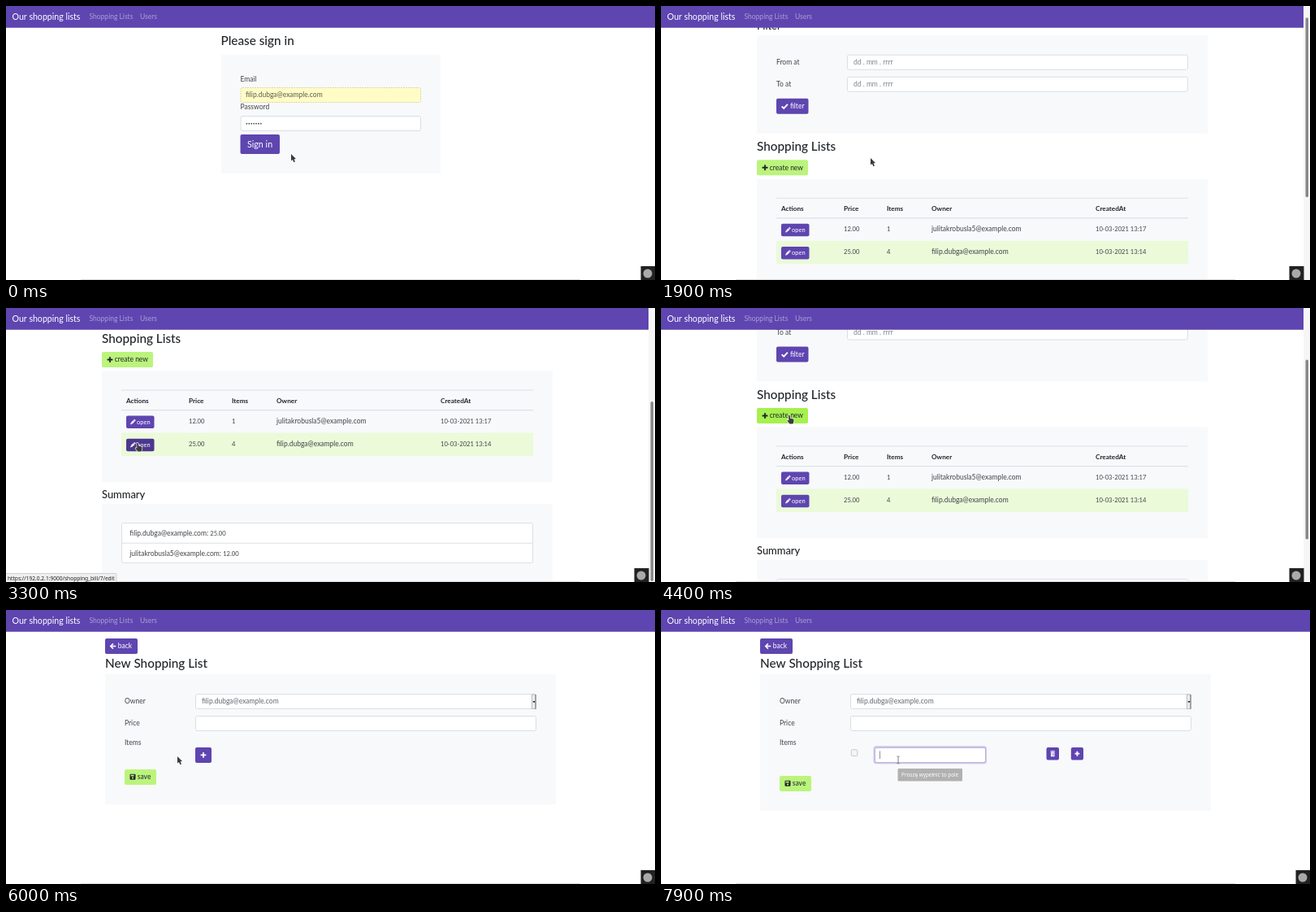
Recreate the animation shown at these times as an HTML page with a canvas. Size 799 by 337 pixels, loop 8 s.

```html
<!DOCTYPE html>
<html lang="en">
<head>
<meta charset="utf-8">
<title>Our shopping lists</title>
<style>
html, body { margin: 0; width: 100%; height: 100%; overflow: hidden; background: #fff; }
canvas { display: block; }
</style>
</head>
<body>
<canvas id="stage" width="799" height="337"></canvas>
<script>
const ctx = document.getElementById('stage').getContext('2d');
const LOOP = 8000, STEP = 100;
const PURPLE = '#5e45b0', PURPLE_DARK = '#4c378f', LIME = '#bbf47c', LIME_DARK = '#a6f04f';
const INK = '#404448', HEAD = '#212529', FIELD = '#626970';
const CARD = '#f8f9fb', LINE = '#dadee3', RULE = '#dee2e6', SYS_LINE = '#cdcdd0';
const UI = 'Lato, sans-serif', SYS = '"Noto Sans", sans-serif';
const ME = 'filip.dubga@example.com', FRIEND = 'julitakrobusla5@example.com';
const HOST = '192.0.2.1', BASE = 'https://192.0.2.1:9000/shopping_bill/';

// rows of [time, value...]; eased between neighbours
const MOUSE = [
  [0, 351, 182], [300, 322, 167], [400, 322, 167], [700, 326, 179], [1600, 326, 179],
  [2200, 190, 195], [2500, 190, 195], [3200, 162, 172], [3300, 161, 166], [3700, 161, 166],
  [4300, 157, 132], [4800, 157, 132], [5500, 263, 124], [6000, 211, 180], [6400, 240, 178],
  [6800, 240, 178], [7300, 292, 184]
];
const SCROLL = [[1700, 0], [2300, 68.5], [2500, 68.5], [2900, 153], [3700, 153], [4300, 84]];

let mouse, pointer, offset;

function track(rows, t) {
  let i = rows.findIndex(r => r[0] > t);
  if (i < 0) return rows[rows.length - 1].slice(1);
  if (i === 0) return rows[0].slice(1);
  const a = rows[i - 1], b = rows[i];
  const p = (t - a[0]) / (b[0] - a[0]), e = p * p * (3 - 2 * p);
  return a.slice(1).map((v, k) => v + (b[k + 1] - v) * e);
}

function rect(x, y, w, h, fill, r = 0, stroke) {
  ctx.beginPath();
  ctx.roundRect(x, y, w, h, r);
  if (fill) { ctx.fillStyle = fill; ctx.fill(); }
  if (stroke) { ctx.strokeStyle = stroke; ctx.lineWidth = 1; ctx.stroke(); }
}

function text(str, x, y, { size = 8.5, color = INK, weight = 400, font = UI, align = 'left' } = {}) {
  ctx.font = `${weight} ${size}px ${font}`;
  ctx.fillStyle = color;
  ctx.textAlign = align;
  ctx.fillText(str, x, y);
  return ctx.measureText(str).width;
}

function path(points, width, color, close) {
  ctx.beginPath();
  points.forEach(([x, y]) => ctx.lineTo(x, y));
  if (close) ctx.closePath();
  ctx.lineWidth = width;
  ctx.strokeStyle = color;
  ctx.stroke();
}

const num = (s, x, y) => text(s, x, y, { size: 7.6 });
const title = (s, x, y, size = 15.3) => text(s, x, y, { size, weight: 500, color: HEAD });
const over = (x, y, w, h) =>
  mouse[0] >= x && mouse[0] <= x + w && mouse[1] >= y + offset && mouse[1] <= y + h + offset;

function button(x, y, w, h, lime) {
  const hot = over(x, y, w, h);
  if (hot) pointer = 'hand';
  rect(x, y, w, h, lime ? (hot ? LIME_DARK : LIME) : (hot ? PURPLE_DARK : PURPLE), 2);
}

function input(x, y, w, h = 19) {
  if (over(x, y, w, h)) pointer = 'text';
  rect(x + .5, y + .5, w - 1, h - 1, '#fff', 2, LINE);
}

// icons are placed by their centre
function plus(x, y, r, color) {
  rect(x - r, y - .9, 2 * r, 1.8, color, .5);
  rect(x - .9, y - r, 1.8, 2 * r, color, .5);
}
function check(x, y) {
  path([[x - 3.6, y + .2], [x - 1.1, y + 2.6], [x + 3.6, y - 2.4]], 1.9, '#fff');
}
function pencil(x, y) {
  ctx.save();
  ctx.translate(x, y);
  ctx.rotate(Math.PI / 4);
  rect(-1.2, -4.2, 2.4, 1.5, '#fff', .5);
  rect(-1.2, -2.3, 2.4, 4.2, '#fff');
  ctx.beginPath();
  ctx.moveTo(-1.2, 2); ctx.lineTo(1.2, 2); ctx.lineTo(0, 4.2);
  ctx.fill();
  ctx.restore();
}
function trash(x, y) {
  rect(x - 2.8, y - 3.2, 5.6, 1, '#fff');
  rect(x - 1, y - 3.8, 2, .8, '#fff');
  rect(x - 2.3, y - 1.8, 4.6, 5.4, '#fff', .6);
  for (const d of [-1.2, 0, 1.2]) rect(x + d - .2, y - .9, .4, 3.5, PURPLE);
}
function disk(x, y) {
  rect(x - 3.5, y - 3.5, 7, 7, HEAD, 1);
  rect(x - 2.4, y - 2.5, 4, 1.8, LIME);
  ctx.beginPath();
  ctx.arc(x, y + 1.4, 1.1, 0, 7);
  ctx.fill();
}
function arrowLeft(x, y) {
  path([[x + 3.5, y], [x - 2.8, y]], 1.6, '#fff');
  path([[x + .2, y - 3.1], [x - 2.9, y], [x + .2, y + 3.1]], 1.6, '#fff');
}
function chevron(x, y, color = '#333') {
  path([[x - 2.2, y - 1.1], [x, y + 1.1], [x + 2.2, y - 1.1]], 1.2, color);
}

function navbar(w) {
  rect(0, 0, w, 26.7, PURPLE);
  text('Our shopping lists', 7.5, 16.7, { size: 10.6, color: '#fff' });
  const color = 'rgba(255,255,255,.48)';
  text('Shopping Lists', 102.5, 16.2, { color });
  text('Users', 165, 16.2, { color });
}

function toolbar(x) {
  rect(x, 320, 18, 17, '#222');
  ctx.beginPath();
  ctx.arc(x + 8.5, 329, 5.5, 0, 7);
  ctx.fillStyle = '#aaa';
  ctx.fill();
}

function status(str, w) {
  rect(-1, 326.5, w, 12, '#efeff0', 1, '#d2d2d4');
  text(str, 2, 334.8, { size: 6.6, font: SYS, color: '#222' });
}

function dots(x, y, n, gap) {
  ctx.fillStyle = '#444';
  for (let i = 0; i < n; i++) {
    ctx.beginPath();
    ctx.arc(x + i * gap, y, .85, 0, 7);
    ctx.fill();
  }
}

function signIn() {
  title('Please sign in', 264.5, 48.3);
  rect(265, 60, 270, 146, CARD);
  text('Email', 288.5, 92.5);
  rect(289, 100.5, 221.5, 18, '#fffcc6', 2);
  ctx.setLineDash([2, 1]);
  rect(289, 100.5, 221.5, 18, null, 2, '#ddd8a8');
  ctx.setLineDash([]);
  text(ME, 295, 112.3, { color: '#5c5b4c' });
  text('Password', 288.5, 127.3);
  input(288.5, 135, 222.5);
  dots(296.4, 144.7, 7, 2.9);
  button(288.5, 158, 48.5, 24);
  text('Sign in', 297, 173.7, { size: 10.7, color: '#fff' });
}

function listRow(y, price, items, owner, date) {
  button(148, y + 6.5, 34.5, 15.5);
  pencil(156, y + 14.4);
  text('open', 161, y + 16.7, { size: 7.5, color: '#fff' });
  num(price, 225, y + 15.6);
  num(items, 278, y + 15.6);
  text(owner, 333, y + 15.6);
  num(date, 535, y + 15.6);
}

function shoppingLists() {
  title('Filter', 118, 47, 12.9);
  rect(118, 54, 555, 120.5, CARD);
  [['From at', 77.5], ['To at', 104.5]].forEach(([label, y]) => {
    text(label, 142, y + 12);
    input(229, y, 420);
    text('dd . mm . rrrr', 237, y + 12, { color: '#7f868c' });
  });
  button(142, 131.5, 39.5, 19);
  check(152.3, 141);
  text('filter', 159, 143.8, { color: '#fff' });

  title('Shopping Lists', 118, 195.7);
  button(118, 207, 63, 19, true);
  plus(128, 216.5, 3.4, HEAD);
  text('create new', 133.8, 219.4, { color: HEAD });

  rect(118, 230.5, 555, 136.5, CARD);
  rect(142, 253.5, 507, 1, RULE);
  [['Actions', 148], ['Price', 225], ['Items', 278], ['Owner', 333], ['CreatedAt', 535]]
    .forEach(([s, x]) => text(s, x, 269.5, { weight: 700, size: 8.2, color: HEAD }));
  rect(142, 278, 507, 1.2, RULE);
  rect(142, 306.5, 507, 28.5, '#ebfad9');
  listRow(279, '12.00', '1', FRIEND, '10-03-2021 13:17');
  listRow(307.2, '25.00', '4', ME, '10-03-2021 13:14');

  title('Summary', 118, 387, 12.9);
  rect(118, 394, 555, 96, CARD);
  rect(142.5, 417.5, 506, 49, '#fff', 2, '#dcdfe2');
  rect(142, 441.8, 507, 1, '#dcdfe2');
  [[ME, '25.00', 433.2], [FRIEND, '12.00', 457.6]].forEach(([who, sum, y]) => {
    const w = text(who + ': ', 152.3, y);
    num(sum, 152.3 + w, y);
  });
}

function scrollbar(s) {
  rect(791, 0, 8, 337, '#f6f6f7');
  rect(793.5, 1 + s * .745, 3.5, 221, '#88888a', 1.7);
}

function newList(t) {
  const added = t >= 6900, shift = added ? 8 : 0;
  button(122, 35, 40, 19);
  arrowLeft(131.7, 44.5);
  text('back', 137.8, 47.4, { color: '#fff' });
  title('New Shopping List', 122, 71.3);
  rect(122, 79, 555, 160 + shift, CARD);
  text('Owner', 146, 115.2);
  rect(233.5, 103.5, 419, 18, '#fff', 2, LINE);
  text(ME, 241, 115.2, { color: FIELD });
  rect(647.5, 104, 4.5, 17.5, '#ececed', 0, '#bcbcbe');
  rect(651.5, 104, 1, 18, '#777');
  rect(648.8, 112, 2.4, 1.6, '#222');
  text('Price', 146, 142.2);
  input(233, 130, 420);
  text('Items', 146, 165.5);

  if (added) itemRow(t);
  else {
    button(233, 169, 20, 19);
    plus(243, 178.3, 3.4, '#fff');
  }
  button(146, 196 + shift, 39, 19, true);
  disk(156, 205.2 + shift);
  text('save', 161.8, 208.3 + shift, { color: HEAD });
}

function itemRow(t) {
  rect(234.3, 171.8, 7.5, 7.7, '#f5f5f6', 1.5, '#c8c8cb');
  const focus = Math.max(0, Math.min(1, (t - 7300) / 200));
  if (focus) rect(261.5, 167.3, 139.5, 22, `rgba(94,69,176,${.28 * focus})`, 3.5);
  input(263, 169, 137);
  if (focus) {
    rect(263.5, 169.5, 136, 18, null, 2, `rgba(190,179,226,${focus})`);
    rect(269.2, 173.5, .8, 9.5, '#777');
  }
  button(474.5, 169, 15.5, 15.5);
  trash(482.2, 176.7);
  button(504.8, 169, 15.2, 15.5);
  plus(512.4, 176.7, 3, '#fff');
  if (t >= 7900) {
    rect(291.5, 195, 79.5, 15.5, '#b1b1b1', 1);
    text('Proszę wypełnić to pole', 331.2, 205.2, { size: 6.4, font: SYS, color: '#fff', align: 'center' });
  }
}

function savePrompt(alpha, dy) {
  const sys = (s, x, y, color = '#222', align) => text(s, x, y, { size: 6.6, font: SYS, color, align });
  ctx.save();
  ctx.globalAlpha = alpha;
  ctx.translate(0, dy);
  rect(147, -30, 198, 110.3, '#fbfbfb', 0, '#9c9ca2');
  rect(176, 4, 161.5, 15, '#fff', 1.5, SYS_LINE);
  sys(ME, 180, 14);
  chevron(333, 11.8);
  rect(176, 22, 161.5, 15, '#fff', 1.5, SYS_LINE);
  dots(181.5, 29.7, 7, 3);
  rect(177.5, 42.3, 7.5, 7.5, '#f3f3f3', 1, '#b5b5b8');
  sys('Widoczne hasło', 186.8, 48.5);
  rect(219, 49.5, 4, .6, '#222');
  rect(147.3, 59, 99.7, 21.2, '#ebebed');
  rect(147.3, 58.3, 197.5, .7, '#c9c9cc');
  rect(223, 62, .8, 15.5, '#c4c4c8');
  sys('Nie uaktualniaj', 185.7, 72.3, '#222', 'center');
  rect(162.2, 73.4, 4.5, .6, '#222');
  chevron(235, 69.8);
  rect(246.6, 58.7, 98.2, 21.5, '#0060df');
  sys('Uaktualnij', 296.3, 72.3, '#fff', 'center');
  rect(280.5, 73.4, 4.5, .6, '#fff');
  ctx.restore();
}

function shape(points) {
  const at = points.map(([x, y]) => [mouse[0] + x, mouse[1] + y]);
  ctx.lineJoin = 'round';
  path(at, 1.3, 'rgba(255,255,255,.9)', true);
  ctx.fillStyle = '#3b3b3e';
  ctx.fill();
  ctx.lineJoin = 'miter';
}

function cursor() {
  const [x, y] = mouse;
  if (pointer === 'text') {
    rect(x - .4, y - 4, .8, 9, '#666');
    rect(x - 1.8, y - 4.3, 3.6, .7, '#777');
    rect(x - 1.8, y + 4.5, 3.6, .7, '#777');
  } else if (pointer === 'hand') {
    shape([[0, 0], [1.6, 0], [2, 3.6], [5.8, 4.4], [6.6, 5.6], [6.2, 8.6], [5.4, 10.6],
      [1.4, 10.6], [-1.6, 6.8], [-1, 5.8], [.4, 6.6]]);
  } else {
    shape([[0, 0], [0, 8.6], [1.9, 7], [3.4, 10.3], [5, 9.5], [3.6, 6.4], [6, 6]]);
  }
}

function draw(t) {
  mouse = track(MOUSE, t);
  pointer = 'arrow';
  offset = 0;
  rect(0, 0, 799, 337, '#fff');
  const onList = t >= 1000 && t < 4900;
  if (onList) {
    const [s] = track(SCROLL, t);
    offset = -s;
    ctx.save();
    ctx.translate(0, -s);
    shoppingLists();
    ctx.restore();
    scrollbar(s);
  } else if (t < 1000) signIn();
  else newList(t);

  navbar(onList ? 791 : 799);
  rect(92, 336, 615, 1, '#dcdcde');
  if (t < 1000 || t >= 5200) toolbar(781.5);
  else if (t >= 1200 && onList) toolbar(773.5);

  if (t >= 1000 && t < 1300) status(HOST, 146);
  if (t >= 3300 && t < 3900) status(BASE + '7/edit', 137);
  if (t >= 4500 && t < 4900) status(BASE + 'new', 118);
  if (t >= 6500 && t < 6900) status(BASE + 'new#', 122);

  if (t >= 500 && t < 1400) {
    const p = Math.min(1, (t - 400) / 300);
    savePrompt(t >= 1300 ? .4 : p, (p - 1) * 14);
  }
  cursor();
}

function tick(now) {
  draw(Math.floor(now % LOOP / STEP) * STEP);
  requestAnimationFrame(tick);
}
requestAnimationFrame(tick);
</script>
</body>
</html>
```
